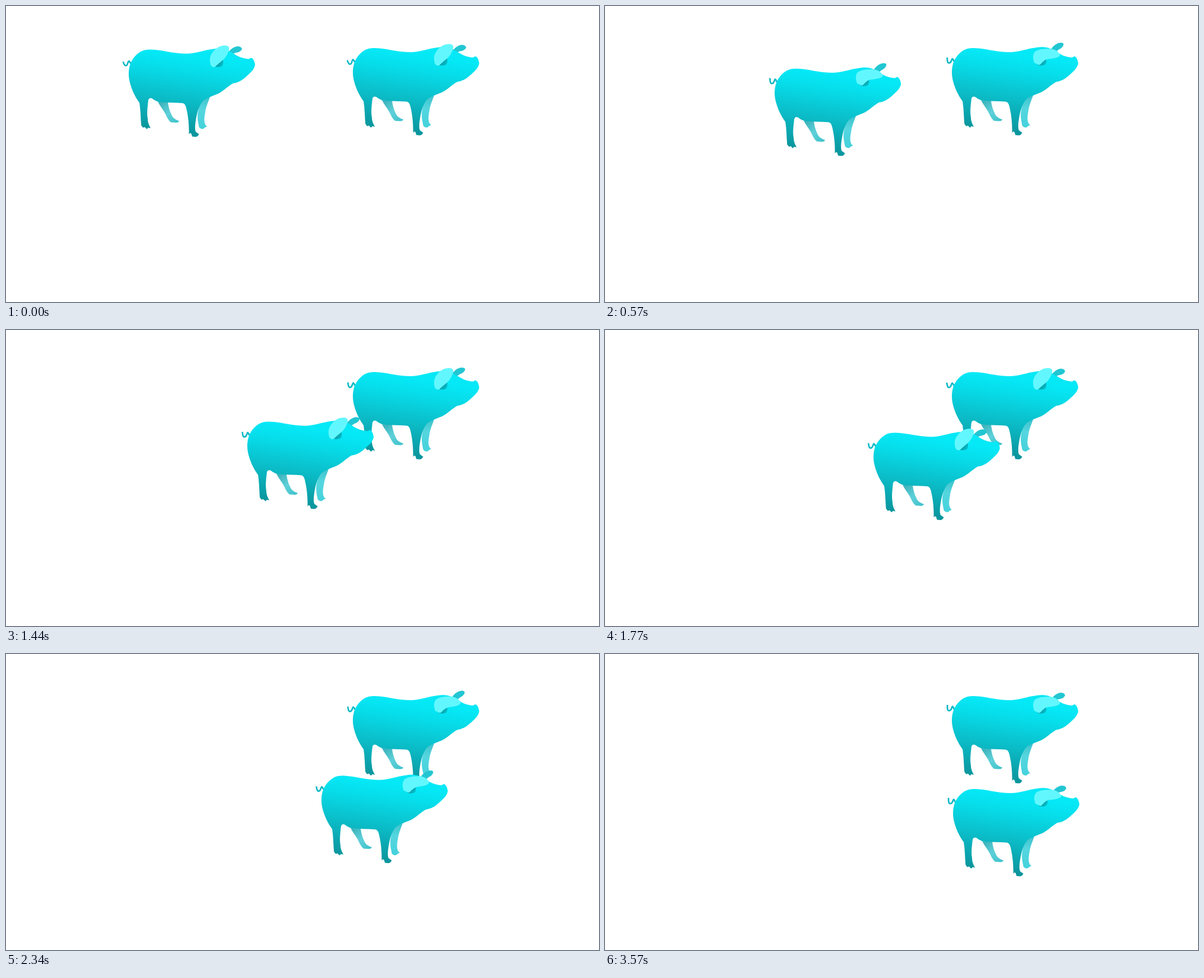
An HTML page that plays this animation: 1000x500 px, repeating every 3600 ms.

```html
<!DOCTYPE html>
<html lang="en">
<head>
<meta charset="utf-8">
<title>Two pigs</title>
<style>
  html, body { margin: 0; width: 100%; height: 100%; overflow: hidden; background: #fff; }
  svg { display: block; width: 100vw; height: 100vh; }
</style>
</head>
<body>
<svg viewBox="0 0 1000 500">
  <defs>
    <linearGradient id="skin" gradientUnits="userSpaceOnUse" x1="702" y1="85" x2="684" y2="212">
      <stop offset="0" stop-color="#05e8f6"/>
      <stop offset=".2" stop-color="#07dce9"/>
      <stop offset=".6" stop-color="#0bbac5"/>
      <stop offset="1" stop-color="#0b969e"/>
    </linearGradient>
    <linearGradient id="hind" gradientUnits="userSpaceOnUse" x1="640" y1="160" x2="668" y2="194">
      <stop offset="0" stop-color="#3cb4bc"/>
      <stop offset=".5" stop-color="#5fd0d9"/>
      <stop offset="1" stop-color="#3fc3cc"/>
    </linearGradient>
    <linearGradient id="fore" gradientUnits="userSpaceOnUse" x1="714" y1="152" x2="708" y2="204">
      <stop offset="0" stop-color="#3fc3cd"/>
      <stop offset=".4" stop-color="#55d6df"/>
      <stop offset="1" stop-color="#45d2dc"/>
    </linearGradient>
    <linearGradient id="shade" gradientUnits="userSpaceOnUse" x1="734" y1="92" x2="744" y2="99">
      <stop offset="0" stop-color="#0799a3"/>
      <stop offset="1" stop-color="#08c0cc"/>
    </linearGradient>
    <filter id="soft" x="-20%" y="-20%" width="140%" height="140%">
      <feGaussianBlur id="blur" stdDeviation="0"/>
    </filter>
    <g id="pig">
      <path fill="url(#hind)" d="M634 159L651 160C652 168 654 175 657 181C660 188 665 190 670 191.5
        Q669 195 664 194.5L656 194C650 189 648 181 644 175C640 169 637 165 634 159Z"/>
      <path fill="url(#fore)" d="M722 151C719 160 715 168 714 177C712 187 711 197 717 201L713 203Q711 206 708 205
        Q703 204 703 199C701 190 700 181 703 171C704 165 706 160 709 155Z"/>
      <path id="farEar" fill="#22c6d2"/>
      <path id="tail" fill="none" stroke="#0fb9c5" stroke-width="2.6" stroke-linejoin="round"/>
      <path fill="url(#skin)" d="M587 97C590 88 597 79 605 74.5C612 70.5 621 70.5 630 71.5C648 73.5 663 78 682 78
        C698 78 711 72 728 70C737 68.5 744 69 751 72C758 75 764 80 772 83.5C778 85.5 783 87 788 87
        Q790 84.5 793 85.5Q797 89 798 97C797 103 792 109 786 114C779 121 771 127 761 128
        C752 133 745 141 735 146C727 149 719 152 711 157C705 163 701 174 699 185
        C697 196 696 205 698 210L703.5 214Q701 219 697 218.5L692 218L690.5 213L688.5 212L686.5 214
        C687 198 685 182 682 170C681 165 679 162 675 161.5C663 160.5 651 161 641 160
        C633 159.5 629 157 625 154Q620 151 618 156C617 166 615 178 617 188C617 195 620 200 622 204
        L618 203L615.5 205.5L612 202L609 203L606 199C605 187 605 173 603 161
        C595 150 589 137 586 123C584 113 585 104 587 97Z"/>
      <path fill="url(#shade)" d="M730 100C735 101 741 101 743 98C745 94 744.500 90 743 87L737 88Z"/>
      <path id="nearEar" fill="#62f7fe" filter="url(#soft)"/>
    </g>
  </defs>
  <use href="#pig"/>
  <use href="#pig" id="walker"/>
</svg>
<script>
const LOOP = 3600, STEP = 30, WALK = 2736;
const el = id => document.getElementById(id);

const shapes = {
  nearEar: [
    "M723 97C721 89 721 82 727 75C733 67 742 63 750 64.5C755 65.5 755 70 753 75C750 83 745 88 741 91C736 95 733 98 731 100C728 102 725 100 723 97Z",
    "M724 96C721 88 721 82 725 77C732 73 742 72 753 73C760 74 766 78 768 83C768 87 760 88 753 89C746 89 743 91 741 92C738 94 736 98 733 100C730 101 727 100 724 96Z"
  ],
  farEar: [
    "M752 77C756 71 762 66 769 65.5Q775 66 776 70C774 75 769 76 765 76.500Q761 78 758 80Z",
    "M749 76C752 69 757 63 764 60.5Q770 58 772 60.5C772 66 769 69 766 71.500Q761 76 759 80Z"
  ],
  tail: [
    "M575.5 91.5C577 97 579 99 581 98C584 97 583 91 585 90.500C587 90 586 95 591 95",
    "M577.5 85.5C577 93 578 96 580 95.500C585 96 584 90 586 88.500C588 88 587 94 591 95"
  ]
};

// [time, amount] keys, joined by straight lines
const keys = {
  nearEar: [[0, 0], [600, 1], [1200, 0], [1800, 0], [2400, 1], [3000, 0], [3600, 1]],
  farEar: [[0, 0], [900, 1], [1800, 0], [2700, 1], [3600, 0]],
  tail: [[0, 0], [570, .75], [1110, .6], [1770, .45], [2070, .15], [2640, .75], [3240, .05], [3600, 1]]
};

function amount(track, t) {
  const i = track.findIndex(k => k[0] > t);
  const [t0, a] = track[i - 1], [t1, b] = track[i];
  return a + (b - a) * (t - t0) / (t1 - t0);
}

function morph([from, to], k) {
  const ends = to.match(/[\d.]+/g);
  let i = 0;
  return from.replace(/[\d.]+/g, n => (+n + (ends[i++] - n) * k).toFixed(2));
}

function draw(t) {
  for (const id in shapes) el(id).setAttribute("d", morph(shapes[id], amount(keys[id], t)));
  el("blur").setAttribute("stdDeviation", .2 + .6 * amount(keys.nearEar, t));
  const p = Math.min(1, t / WALK);
  el("walker").setAttribute("transform", `translate(${-378 + 380 * p} ${2.5 + 154.5 * p})`);
}

const start = performance.now();
function tick() {
  const t = (performance.now() - start) % LOOP;
  draw(Math.floor(t / STEP) * STEP);
  requestAnimationFrame(tick);
}
tick();
</script>
</body>
</html>
```
